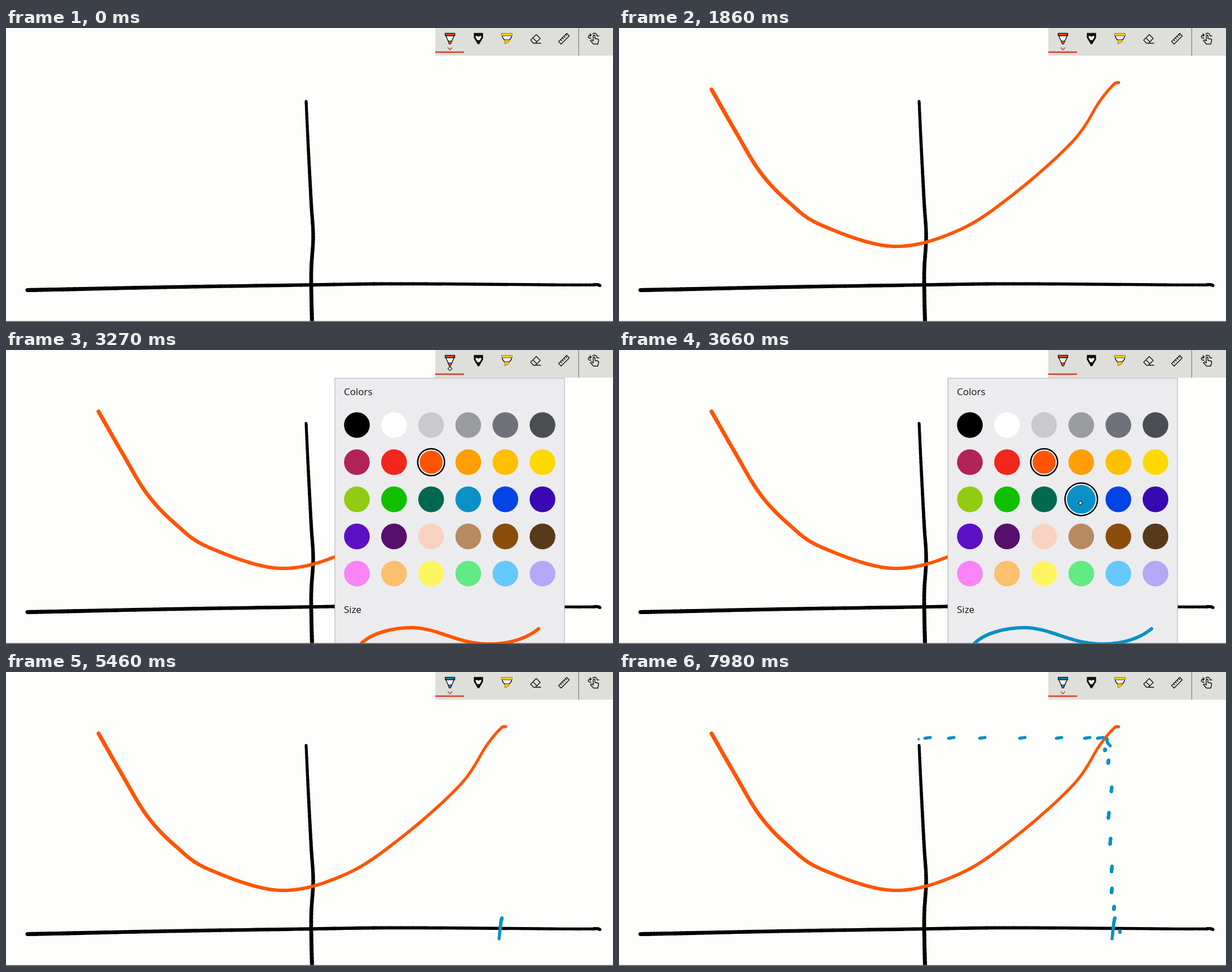
Recreate the animation shown at these times as an HTML page with a canvas. Size 1076x521 px, loop 8000 ms.

```html
<!DOCTYPE html>
<html lang="en">
<head>
<meta charset="utf-8">
<title>Whiteboard graph</title>
<style>
  html, body { margin: 0; width: 100%; height: 100%; overflow: hidden; background: #fdfdfb; }
  canvas, svg { position: absolute; left: 0; top: 0; width: 1076px; height: 521px; }
  text { font: 17px "Open Sans", "Noto Sans", sans-serif; fill: #111; }
  .icon { fill: none; stroke: #111; stroke-width: 1.4; stroke-linejoin: round; stroke-linecap: round; }
</style>
</head>
<body>
<canvas id="ink"></canvas>
<svg viewBox="0 0 1076 521">
  <rect x="761" width="315" height="49" fill="#dededb"/>
  <rect x="1014.5" width="1.5" height="49" fill="#8e8e9c"/>
  <g class="icon">
    <path d="M779.5 13.5 L786 28 H788 L794.5 13.5 Z" fill="#f4f4f4"/>
    <path class="tint" d="M784 23 H790 L788 28.500 H786 Z" stroke-width="1"/>
    <rect class="tint" x="778.5" y="9.5" width="17" height="4"/>
    <path d="M830 9.5 H845 V17 L838.500 28 H836.500 L830 17 Z" fill="#111"/>
    <path d="M832.5 14.5 Q835 13 837.5 15.5 Q840 13 842.5 14.5 V16.5 L839.5 21.5 H835.5 L832.5 16.5 Z" fill="#f0f0f0" stroke="none"/>
    <path d="M880 13.5 V16.5 L883.5 21 H892.5 L896 16.5 V13.5 Z" fill="#f4f4f4"/>
    <path d="M884.5 21 H891.5 V24.5 L884.5 28 Z" fill="#ffc800" stroke="#a47c10" stroke-width="1"/>
    <rect x="878.5" y="9.5" width="19" height="4" fill="#ffcf0a" stroke="#a47c10" stroke-width="1"/>
    <path d="M930 21.5 L940 11.5 L947 18.5 L938.5 27 H935 Z M934 17.5 L941 24.5 M938.5 27 H948"/>
    <path d="M979.5 24 L994 9.5 L998.5 14 L984 28.5 Z M983 20.5 l2 2 M986 17.5 l2 2 M989 14.5 l2 2 M992 11.5 l2 2"/>
    <path d="M1041 23 V13.5 Q1042.5 11.5 1044 13.5 V18.5 L1049 19.5 Q1051 20 1050.5 22.5 L1049 28.5 H1041.5 L1036 22.5 Q1037 20.5 1039 21.5 L1041 23 M1037 18 H1034 Q1031 16 1033 13.5 Q1034 12.5 1037 12.5 M1035 10 L1037.5 12.5 L1035 15 M1040 10.5 Q1043 8 1046.5 10.5 Q1048 12 1047.5 14 H1051"/>
  </g>
  <path id="chevron" d="M783 34.5 L787 38.5 L791 34.5" fill="none" stroke="#d9472f" stroke-width="1.6"/>
  <rect x="761" y="41.5" width="51" height="2.6" fill="#d2452e"/>

  <g id="menu">
    <rect x="583" y="50" width="407" height="480" fill="#ececee" stroke="#a9abc0"/>
    <text x="599" y="80">Colors</text>
    <g id="swatches"></g>
    <text x="599" y="466">Size</text>
    <path id="preview" d="M628 522 C648 500 690 492 718 492 C765 492 800 521 856 521 C895 521 925 510 944 494"
      fill="none" stroke-width="6" stroke-linecap="round"/>
  </g>
  <rect y="519.3" width="1076" height="1.7" fill="#66666a"/>
  <g id="cursor">
    <path d="M0 -4.5 L4.5 0 L0 4.5 L-4.5 0 Z" fill="#333"/>
    <path d="M0 -2.6 L2.6 0 L0 2.6 L-2.6 0 Z" fill="#fff"/>
  </g>
</svg>
<script>
const LOOP = 8000, W = 1076, H = 521;
const ORANGE = '#ff5500', BLUE = '#0892c3';
const MENU = { open: 3200, pick: 3720, close: 4120 };
const $ = id => document.getElementById(id);
const lerp = (a, b, u) => a + (b - a) * u;
const clamp = u => Math.max(0, Math.min(1, u));
const ease = u => u * u * (3 - 2 * u);
const between = (p, q, u) => ({ x: lerp(p.x, q.x, u), y: lerp(p.y, q.y, u) });

// Catmull-Rom samples through the points, each with its distance from the start.
function smooth(pts) {
  const at = i => pts[Math.max(0, Math.min(pts.length - 1, i))];
  const steps = 12, out = [];
  let d = 0;
  for (let n = 0; n <= (pts.length - 1) * steps; n++) {
    const i = Math.floor(n / steps), u = n / steps - i;
    const [p, q, r, s] = [-1, 0, 1, 2].map(k => at(i + k));
    const mix = k => 0.5 * (2 * q[k] + (r[k] - p[k]) * u
      + (2 * p[k] - 5 * q[k] + 4 * r[k] - s[k]) * u * u
      + (3 * q[k] - p[k] - 3 * r[k] + s[k]) * u * u * u);
    const [x, y] = [mix(0), mix(1)];
    const last = out[n - 1];
    if (last) d += Math.hypot(x - last.x, y - last.y);
    out.push({ x, y, d });
  }
  return out;
}

function stroke(color, start, end, w0, w1, pts) {
  const path = smooth(pts);
  return { color, start, end, w0, w1, path, len: path[path.length - 1].d };
}

const axes = [
  stroke('#000', -1, 0, 5, 7, [[532, 130], [536, 215], [541, 310], [544.5, 370], [541, 435], [542.5, 524]]),
  stroke('#000', -1, 0, 7, 5, [[38, 464.5], [110, 463], [300, 459], [540, 455.3], [700, 453.3], [1005, 455.3], [1045, 454.7], [1053, 456.5]])
];
const curve = stroke(ORANGE, 350, 1700, 7, 4.8, [
  [164, 109], [207, 184], [250, 255], [300, 308], [360, 350], [486, 387],
  [603, 358], [705, 290], [806, 199], [852, 130], [877, 100], [886, 97]
]);
const mark = stroke(BLUE, 5200, 5420, 6, 5, [[879, 436], [877, 446], [874, 473]]);

// Dashes climb from the mark to the curve, longest halfway, then run left to the axis.
const climb = [[888, 460], [877.5, 418], [873.5, 387], [873.5, 349], [871, 300], [868, 254], [873, 208], [867.5, 159], [861.5, 138]]
  .map(([x, y], i, all) => {
    const half = 5 * Math.sin(Math.PI * (i + 0.5) / all.length);
    return [[x - half / 10, y + half], [x + half / 10, y - half]];
  });
const across = [853, 830, 780, 715, 644, 589, 547].map(x => [[x + 5, 116], [x - 5, 117.5]]);
const corner = [[865, 118], [866, 125], [871, 131]];
const dot = [[531.5, 119], [531, 119]];
const dashes = [...climb, corner, ...across, dot].map((pts, i) => {
  const start = 5500 + i * 70, w = pts === dot ? 3 : i < climb.length ? 6 : 5;
  return stroke(BLUE, start, start + 30, w, w, pts);
});
const strokes = [...axes, curve, mark, ...dashes];
const sessions = [[curve], [mark], dashes];

const canvas = $('ink'), ctx = canvas.getContext('2d');
const ratio = window.devicePixelRatio || 1;
canvas.width = W * ratio;
canvas.height = H * ratio;
ctx.scale(ratio, ratio);
ctx.lineCap = 'round';

function progress(s, t) {
  const u = clamp((t - s.start) / (s.end - s.start));
  return s === curve ? lerp(u, ease(u), 0.5) : u;
}

function tip(s, t) {
  const goal = progress(s, t) * s.len;
  const i = Math.max(1, s.path.findIndex(p => p.d >= goal));
  const a = s.path[i - 1], b = s.path[i];
  return between(a, b, clamp((goal - a.d) / (b.d - a.d)));
}

function drawStroke(s, t) {
  if (t < s.start) return;
  const goal = progress(s, t) * s.len, end = tip(s, t);
  ctx.strokeStyle = s.color;
  for (let i = 1; i < s.path.length && s.path[i - 1].d <= goal; i++) {
    const a = s.path[i - 1], b = s.path[i].d > goal ? end : s.path[i];
    ctx.lineWidth = lerp(s.w0, s.w1, a.d / s.len);
    ctx.beginPath();
    ctx.moveTo(a.x, a.y);
    ctx.lineTo(b.x, b.y);
    ctx.stroke();
  }
}

const palette = [
  '#000', '#fff', '#cacace', '#9b9c9e', '#70727a', '#4a4d52',
  '#b2235a', '#f1261c', ORANGE, '#ff9e05', '#ffc000', '#ffd900',
  '#92cc12', '#10c000', '#00694f', '#0991c6', '#0044e6', '#3808b2',
  '#5b10c4', '#560f6c', '#f9d3bf', '#b88a60', '#8a4e0a', '#583a1a',
  '#fb83f5', '#fcc06e', '#fcf560', '#62ea84', '#66c8fc', '#b3a8f8'
];
function addCircle(attrs) {
  const c = document.createElementNS('http://www.w3.org/2000/svg', 'circle');
  for (const key in attrs) c.setAttribute(key, attrs[key]);
  return $('swatches').appendChild(c);
}
const swatches = palette.map((color, i) => {
  const x = 622 + (i % 6) * 65.8, y = 133 + Math.floor(i / 6) * 65.8;
  const ring = addCircle({ cx: x, cy: y, fill: '#fafafc', stroke: '#000', 'stroke-width': 2.5 });
  return { x, y, color, ring, dot: addCircle({ cx: x, cy: y, fill: color }) };
});
const orangeSwatch = swatches[palette.indexOf(ORANGE)];
const blueSwatch = swatches[palette.indexOf('#0991c6')];

const menuMoves = [
  { t: 3000, x: 835, y: 110 }, { t: 3160, x: 787, y: 33 }, { t: 3280, x: 787, y: 33 },
  { t: 3540, x: 818, y: 271 }, { t: 3840, x: 818, y: 271 }, { t: 4120, x: 1035, y: 300 }
];

function cursorAt(t) {
  const next = menuMoves.findIndex(m => m.t > t);
  if (next > 0) {
    const a = menuMoves[next - 1], b = menuMoves[next];
    return between(a, b, ease((t - a.t) / (b.t - a.t)));
  }
  const list = sessions.find(s => t >= s[0].start - 20 && t <= s[s.length - 1].end + 20);
  if (!list) return null;
  const begun = list.filter(s => s.start <= t).length;
  const s = list[Math.max(0, begun - 1)], following = list[begun];
  let p = tip(s, t);
  if (t > s.end && following) {
    p = between(p, following.path[0], (t - s.end) / (following.start - s.end));
  }
  return { x: p.x, y: p.y + 3 };
}

function drawMenu(t, pointer) {
  const open = t >= MENU.open && t < MENU.close;
  const picked = t >= MENU.pick ? blueSwatch : orangeSwatch;
  $('menu').style.display = open ? '' : 'none';
  $('chevron').style.display = open ? 'none' : '';
  document.querySelectorAll('.tint').forEach(e => e.setAttribute('fill', picked.color));
  if (!open) return;
  let shown = picked.color;
  for (const s of swatches) {
    const hover = pointer && Math.hypot(pointer.x - s.x, pointer.y - s.y) < 24;
    if (hover) shown = s.color;
    s.ring.style.display = hover || s === picked ? '' : 'none';
    s.ring.setAttribute('r', hover ? 28.8 : 23.8);
    s.dot.setAttribute('r', hover ? 25.5 : s === picked ? 20.5 : 22.8);
  }
  $('preview').setAttribute('stroke', shown);
}

function render(t) {
  ctx.clearRect(0, 0, W, H);
  strokes.forEach(s => drawStroke(s, t));
  const pointer = cursorAt(t);
  drawMenu(t, pointer);
  $('cursor').style.display = pointer ? '' : 'none';
  if (pointer) $('cursor').setAttribute('transform', `translate(${pointer.x} ${pointer.y})`);
}

const begin = performance.now();
function loop() {
  render((performance.now() - begin) % LOOP);
  requestAnimationFrame(loop);
}
loop();
</script>
</body>
</html>
```
